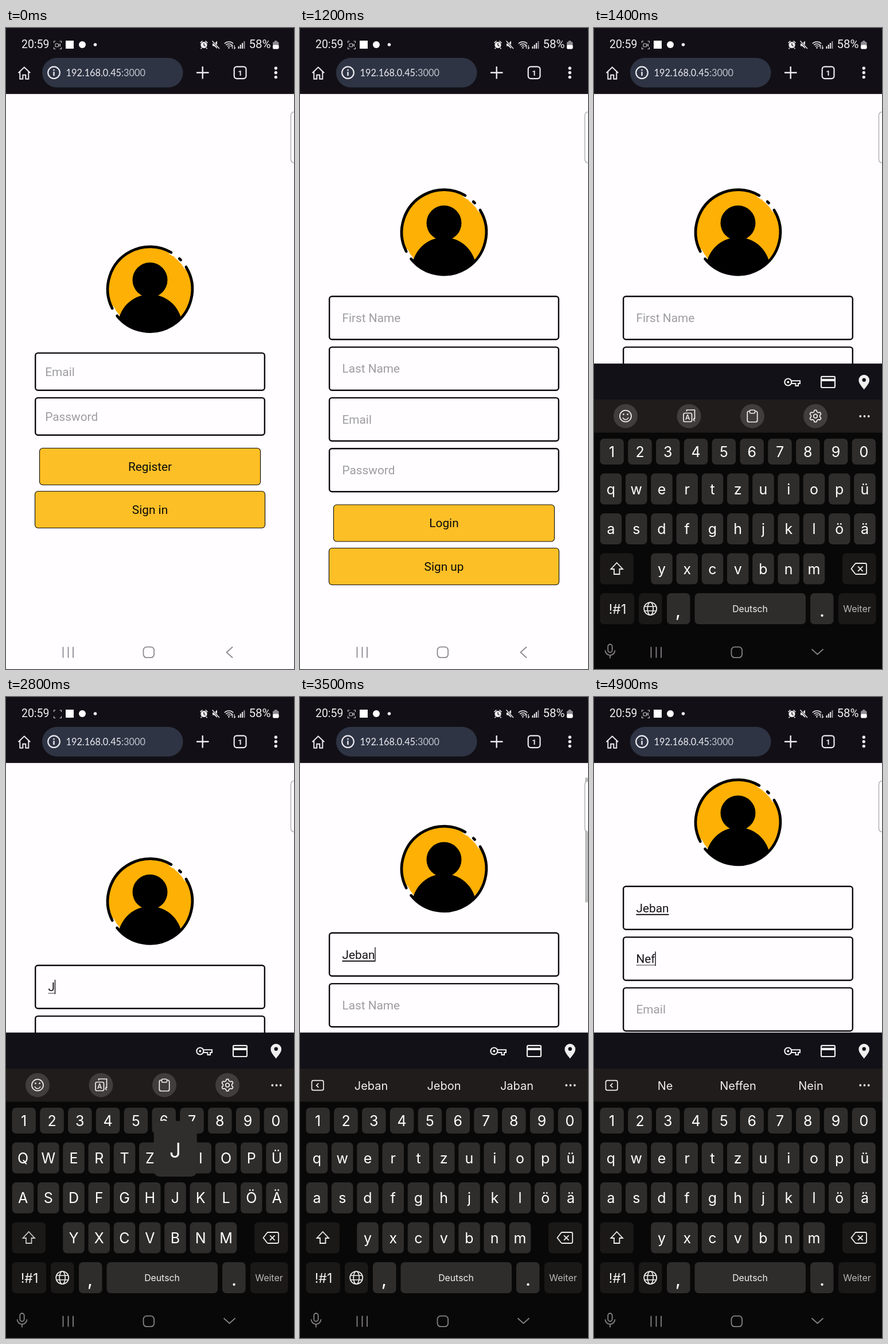
Animation, 502 px wide and 1116 px high, one loop 5000 ms. Source, as an HTML page with a canvas:

```html
<!DOCTYPE html>
<html lang="de">
<head>
<meta charset="utf-8">
<style>
html, body { margin: 0; width: 100%; height: 100%; overflow: hidden; background: #fffdff; }
canvas { display: block; width: 502px; height: 1116px; }
</style>
</head>
<body>
<canvas id="stage"></canvas>
<script>
const W = 502, H = 1116, LOOP = 5000, STEP = 100;
const canvas = document.getElementById('stage');
const ctx = canvas.getContext('2d');
const dpr = window.devicePixelRatio || 1;
canvas.width = W * dpr;
canvas.height = H * dpr;

const WEB = 'Roboto, sans-serif', KEYS = 'Inter, sans-serif';
const KEY = '#2f2d2c', KEY_DARK = '#1b1918', LIGHT = '#f0eff0';
const ROWS = [
  { chars: '1234567890', x: 31.2, pitch: 48.8, y: 715, w: 41.5, h: 45 },
  { chars: 'qwertzuiopü', x: 29.5, pitch: 44.25, y: 775.5, w: 37.5, h: 54 },
  { chars: 'asdfghjklöä', x: 29.5, pitch: 44.25, y: 845, w: 37.5, h: 54 },
  { chars: 'yxcvbnm', x: 118, pitch: 44.25, y: 914.5, w: 37.5, h: 54 }
];
const FIRST = [[2800, 'J'], [3000, 'e'], [3100, 'b'], [3300, 'a'], [3400, 'n']];
const LAST = [[4400, 'N'], [4600, 'e'], [4800, 'f']];
const HINTS = {
  J: ['J', 'Ja', 'Jetzt'],
  Je: ['Je', 'Jetzt', 'Jeder'],
  Jeb: ['Jeb', 'Jeban', 'Jede'],
  Jeba: ['Jeban', 'Jebon', 'Jaban'],
  Jeban: ['Jeban', 'Jebon', 'Jaban'],
  N: ['N', 'Nein', 'Noch'],
  Ne: ['Ne', 'Neffen', 'Nein']
};

const typed = (keys, t) => keys.filter(k => k[0] <= t).map(k => k[1]).join('');

function box(x, y, w, h, r, fill, stroke, lw) {
  ctx.beginPath();
  ctx.roundRect(x, y, w, h, r);
  if (fill) { ctx.fillStyle = fill; ctx.fill(); }
  if (stroke) { ctx.strokeStyle = stroke; ctx.lineWidth = lw; ctx.stroke(); }
}

function disc(x, y, r, fill) {
  ctx.beginPath();
  ctx.arc(x, y, r, 0, 7);
  ctx.fillStyle = fill;
  ctx.fill();
}

function ring(x, y, r, color, lw, from = 0, to = 360) {
  ctx.beginPath();
  ctx.arc(x, y, r, from * Math.PI / 180, to * Math.PI / 180);
  ctx.strokeStyle = color;
  ctx.lineWidth = lw;
  ctx.stroke();
}

function line(d, color, lw, fill) {
  const p = new Path2D(d);
  if (fill) { ctx.fillStyle = fill; ctx.fill(p, 'evenodd'); }
  if (color) { ctx.strokeStyle = color; ctx.lineWidth = lw; ctx.stroke(p); }
}

function text(s, x, y, size, font, color, align = 'left', weight = 400) {
  ctx.font = `${weight} ${size}px ${font}`;
  ctx.textAlign = align;
  ctx.fillStyle = color;
  ctx.fillText(s, x, y);
}

function avatar(cy) {
  ctx.save();
  ctx.translate(251, cy);
  disc(0, 0, 73, '#ffb004');
  ctx.save();
  ctx.beginPath();
  ctx.arc(0, 0, 75.5, 0, 7);
  ctx.clip();
  disc(0, 65, 56, '#000');
  ctx.restore();
  disc(0, -16, 30.5, '#000');
  ctx.lineCap = 'round';
  for (const [a, b] of [[153, 300], [-47, -43.5], [-31.5, 141]]) {
    ring(0, 0, 73.8, '#fffdff', 8, a - 4, a);
    ring(0, 0, 73.8, '#fffdff', 8, b, b + 4);
  }
  for (const [a, b] of [[153, 300], [-46, -43.5], [-31.5, 141]]) ring(0, 0, 73.8, '#000', 4.8, a, b);
  ctx.restore();
}

function field(y, h, pad, hint, value = '', caret = false, thick = false) {
  box(51.2, y + 1.2, 399.6, h - 2.4, 4.5, '#fffdff', '#0b0a0d', 2.4);
  const cy = y + h / 2, x = 50 + pad;
  text(value || hint, x, cy + 7.3, 20.8, WEB, value ? '#141217' : '#9d9ca0');
  const w = value ? ctx.measureText(value).width : 0;
  if (value) {
    ctx.fillStyle = thick ? '#141217' : '#55535a';
    ctx.fillRect(x, cy + 10.5, w, thick ? 2 : 1.2);
  }
  if (caret) {
    ctx.fillStyle = '#141217';
    ctx.fillRect(x + w - 0.2, cy - 12.5, 1.4, 25);
  }
}

function button(x, y, label) {
  box(x + 0.5, y + 0.5, 501 - 2 * x, 64, 5.5, '#fdbf26', '#0b0a0d', 1.1);
  text(label, 251, y + 39.7, 20.8, WEB, '#0b0a0d', 'center');
}

function loginPage() {
  avatar(454.7);
  field(564.7, 67.3, 18.3, 'Email');
  field(642.7, 67.3, 18.3, 'Password');
  button(58, 731, 'Register');
  button(50, 806, 'Sign in');
}

function signupPage(t, scroll) {
  const inLast = t >= 4000;
  const caret = t >= 2600 || (t >= 1600 && t < 2000);
  ctx.save();
  ctx.translate(0, -scroll);
  avatar(355.5);
  field(466, 77.5, 23.5, 'First Name', typed(FIRST, t), caret && !inLast, t >= 3500);
  field(554.4, 77.5, 23.5, 'Last Name', typed(LAST, t), inLast);
  field(642.7, 77.5, 23.5, 'Email');
  field(731, 77.5, 23.5, 'Password');
  button(58, 829.5, 'Login');
  button(50, 905, 'Sign up');
  ctx.restore();
}

function statusBar(t) {
  ctx.fillStyle = '#121016';
  ctx.fillRect(0, 0, W, 114.5);
  ctx.fillStyle = '#3a2536';
  ctx.fillRect(0, 114, W, 1);
  text('20:59', 27, 35.3, 19.4, WEB, LIGHT);
  line('M83.5 26v-3h3M93.5 23h3v3M96.5 33.500v3h-3M86.500 36.500h-3v-3', '#c9c8cc', 1.2);
  if (t % 980 < 600) {
    box(86, 27.2, 5.5, 5.5, 1, null, '#c9c8cc', 1.1);
    line('M92 29.5l2.500 -1.800v4.500z', '#c9c8cc', 1);
  }
  box(104, 22, 14, 14, 0, '#fff');
  disc(133, 29, 6, '#fff');
  disc(155.5, 29, 2.8, LIGHT);

  disc(345, 29.5, 5.6, LIGHT);
  line('M338.500 26l4 -3.500M351.500 26l-4 -3.500M341 34.500l-1.500 1.800M349 34.500l1.500 1.800', LIGHT, 1.6);
  line('M345 26.500v3.500l2.500 1.500', '#121016', 1.3);
  line('M360 27h3l5 -4.500v13.500l-5 -4.500h-3z', null, 0, LIGHT);
  line('M359.500 22.500l12.500 13.500', '#121016', 3);
  line('M359.500 22.500l12.500 13.500', LIGHT, 1.4);
  ring(388.5, 35, 11, LIGHT, 1.4, 225, 315);
  ring(388.5, 35, 7.5, LIGHT, 1.4, 225, 315);
  ring(388.5, 35, 4, LIGHT, 1.4, 225, 315);
  disc(388.5, 34.5, 1.3, LIGHT);
  line('M394.500 36v-6l-2 2M398 30v6l2 -2', LIGHT, 1.2);
  for (let i = 0; i < 4; i++) {
    ctx.fillStyle = i < 3 ? LIGHT : '#9c9aa0';
    ctx.fillRect(404.5 + i * 3.3, 32 - i * 3, 2, 4 + i * 3);
  }
  text('58%', 423.5, 35.3, 20.5, WEB, LIGHT);
  box(465, 24, 10.5, 12.5, 2, '#8d8b91');
  box(468, 22, 4.5, 3, 1, '#8d8b91');
  box(465, 29.5, 10.5, 7, 2, '#fff');

  line('M21.500 78.300L31.800 68.300L42.200 78.300M24.300 76v12.700h5v-7h5v7h5v-12.700', '#eceaf0', 2);
  box(63, 52, 245.5, 51.5, 25.7, '#2e3444');
  ring(83.5, 77.7, 10.3, '#eceaf0', 2.2);
  ctx.fillStyle = '#eceaf0';
  ctx.fillRect(82.3, 76.2, 2.4, 7);
  ctx.fillRect(82.3, 72, 2.4, 2.4);
  text('192.168.0.45', 104.5, 84, 16.3, 'Lato, sans-serif', '#eceaf0');
  const w = ctx.measureText('192.168.0.45').width;
  text(':3000', 104.5 + w, 84, 16.3, 'Lato, sans-serif', '#c0c2cc');
  line('M332 77.800h21.500M342.700 67v21.500', '#eceaf0', 2.4);
  box(397.7, 67.3, 20.8, 20.8, 4.5, null, '#eceaf0', 2.2);
  text('1', 408, 82.7, 13.5, WEB, '#eceaf0', 'center', 700);
  for (const y of [70, 77.8, 85.6]) disc(470.3, y, 2.7, '#eceaf0');
}

function navBar(open) {
  const c = open ? '#858386' : '#8b898f';
  line('M99.500 1077.500v19M108.500 1077.500v19M117 1077.500v19', c, 1.8);
  box(239.5, 1077.7, 18.6, 18.4, 5.5, null, c, 1.8);
  if (!open) return line('M395 1077.500l-10.500 9.500l10.500 9.500', c, 1.8);
  line('M379.500 1081.500l10 9l10 -9', c, 1.8);
  box(24.3, 1073, 7.4, 14, 3.7, null, c, 1.8);
  line('M19.500 1083.500a8.500 8.500 0 0 0 17 0M28 1092v5.500', c, 1.8);
}

function autofillIcons() {
  ctx.fillStyle = '#121117';
  ctx.fillRect(0, 584.5, W, 63);
  ring(338.3, 616.5, 6, LIGHT, 2.2);
  disc(338.3, 616.5, 2, LIGHT);
  line('M344.200 614.300h14.800v4.700h-3v4h-4.500v-4h-7.300', LIGHT, 2);
  box(396, 606.8, 24, 19.2, 2, null, LIGHT, 2.2);
  ctx.fillStyle = LIGHT;
  ctx.fillRect(396, 610.8, 24, 4.2);
  line('M470.700 629.500c-6 -7.500 -9.300 -11.500 -9.300 -16.500a9.300 9.300 0 0 1 18.600 0c0 5 -3.300 9 -9.300 16.500z', null, 0, LIGHT);
  disc(470.7, 612.8, 3.2, '#121117');
}

function toolIcons() {
  for (const x of [55, 165.5, 276, 386]) disc(x, 675.7, 21, '#403d3c');
  ring(55, 675.7, 10, LIGHT, 1.7);
  ring(55, 676.8, 5, LIGHT, 1.6, 15, 165);
  disc(51.4, 672.7, 1.4, LIGHT);
  disc(58.6, 672.7, 1.4, LIGHT);

  line('M161.500 667.500v-2.500h14v15h-2.500', LIGHT, 1.7);
  box(156, 670.5, 14.5, 15, 2.5, '#403d3c', LIGHT, 1.7);
  text('A', 163.2, 682.3, 11.5, KEYS, LIGHT, 'center', 600);
  line('M176 684.500l-3 -2.200l3 -2.200', LIGHT, 1.3);

  box(267.3, 667, 17.4, 19, 3, null, LIGHT, 1.7);
  box(271.5, 665.3, 9, 5.5, 1.5, '#403d3c', LIGHT, 1.6);

  ctx.beginPath();
  for (let i = 0; i <= 64; i++) {
    const a = i / 64 * Math.PI * 2;
    const r = 9 + 1.4 * Math.tanh(2.5 * Math.cos(6 * a));
    ctx.lineTo(386 + r * Math.sin(a), 675.7 - r * Math.cos(a));
  }
  ctx.strokeStyle = LIGHT;
  ctx.lineWidth = 1.7;
  ctx.stroke();
  ring(386, 675.7, 3.3, LIGHT, 1.7);
}

function strip(words) {
  ctx.fillStyle = '#1f1c1b';
  ctx.fillRect(0, 647, W, 57.5);
  if (words) {
    box(20.5, 667.7, 20.5, 17, 3, null, LIGHT, 1.7);
    line('M32.500 672.500l-3.800 3.700l3.800 3.700', LIGHT, 1.7);
    words.forEach((w, i) => text(w, 124 + i * 127, 684, 20, KEYS, LIGHT, 'center'));
  } else toolIcons();
  for (const x of [464.3, 471.5, 478.7]) disc(x, 676, 1.9, LIGHT);
}

function popup(ch) {
  const row = ROWS.find(r => r.chars.includes(ch.toLowerCase()));
  const x = row.x + row.pitch * row.chars.indexOf(ch.toLowerCase());
  box(x - 37.3, row.y - 107, 75, 97, 10, '#302e2d');
  text(ch, x, row.y - 43, 35, KEYS, '#fff', 'center');
}

function keyboard(t) {
  const keys = [...FIRST, ...LAST];
  const now = keys.find(k => k[0] === t);
  const caps = t === 2800 || (t >= 4100 && t <= 4400);
  const lag = t - 200;
  const words = HINTS[t >= 4000 ? typed(LAST, lag) : typed(FIRST, lag)];
  const slide = t < 1400 ? 150 : 0;

  ctx.save();
  ctx.translate(0, slide);
  ctx.fillStyle = '#090808';
  ctx.fillRect(0, 584.5, W, H);
  autofillIcons();
  strip(words);

  for (const r of ROWS) {
    [...r.chars].forEach((ch, i) => {
      const x = r.x + i * r.pitch;
      box(x - r.w / 2, r.y, r.w, r.h, 7, KEY);
      text(caps ? ch.toUpperCase() : ch, x, r.y + r.h / 2 + 9.3, 25, KEYS, '#fff', 'center');
    });
  }

  box(10.5, 914.5, 58.5, 54, 7, KEY_DARK);
  line('M39.700 931l10.300 11h-5.500v9h-9.500v-9h-5.500z', caps ? '#c8c6c6' : LIGHT, 1.8);
  box(433, 914.5, 58.5, 54, 7, KEY_DARK);
  line('M448.500 941.500l6.500 -8.500q.8 -1 2 -1h15.500q2.500 0 2.500 2.500v14q0 2.500 -2.500 2.500h-15.500q-1.200 0 -2 -1zM460 937.300l8.500 8.500M468.500 937.300l-8.500 8.500', LIGHT, 1.8);

  box(10.5, 984, 59.5, 54, 7, KEY_DARK);
  text('!#1', 41, 1019.5, 23, KEYS, LIGHT, 'center');
  box(78, 984, 40.5, 54, 7, KEY_DARK);
  ring(98.2, 1011, 11, LIGHT, 1.7);
  ctx.beginPath();
  ctx.ellipse(98.2, 1011, 5, 11, 0, 0, 7);
  ctx.stroke();
  line('M88 1007.300h20.400M88 1014.700h20.400', LIGHT, 1.5);
  box(127, 984, 40.5, 54, 7, KEY);
  text(',', 146.5, 1025, 30, KEYS, '#fff', 'center', 500);
  box(175.5, 984, 193.5, 54, 7, KEY);
  text('Deutsch', 272, 1017, 15.8, KEYS, LIGHT, 'center');
  box(377, 984, 40.5, 54, 7, KEY);
  text('.', 397.5, 1025, 30, KEYS, '#fff', 'center', 500);
  box(426, 984, 65.5, 54, 7, KEY_DARK);
  text('Weiter', 458.5, 1017, 16, KEYS, '#b9b7b7', 'center');
  if (now) popup(now[1]);
  ctx.restore();
}

function draw(t) {
  const x = Math.min(1, Math.max(0, (t - 3400) / 430));
  const scroll = 137.5 * (1 - (1 - x) ** 2);
  const open = t >= 1300;

  ctx.setTransform(dpr, 0, 0, dpr, 0, 0);
  ctx.fillStyle = '#fffdff';
  ctx.fillRect(0, 0, W, H);
  if (t < 700) loginPage();
  else signupPage(t, scroll);
  if (t > 3400 && t < 4000) {
    ctx.fillStyle = '#bdbcbe';
    ctx.fillRect(497, 115 + 0.45 * scroll, 5, 217);
  }
  box(496.5, 146, 20, 89, 6, '#fffdff', '#a3a2a6', 1.2);
  statusBar(t);
  if (open) keyboard(t);
  navBar(open);
}

const start = performance.now();
function tick() {
  const t = (performance.now() - start) % LOOP;
  draw(Math.floor(t / STEP) * STEP);
  requestAnimationFrame(tick);
}
tick();
</script>
</body>
</html>
```
